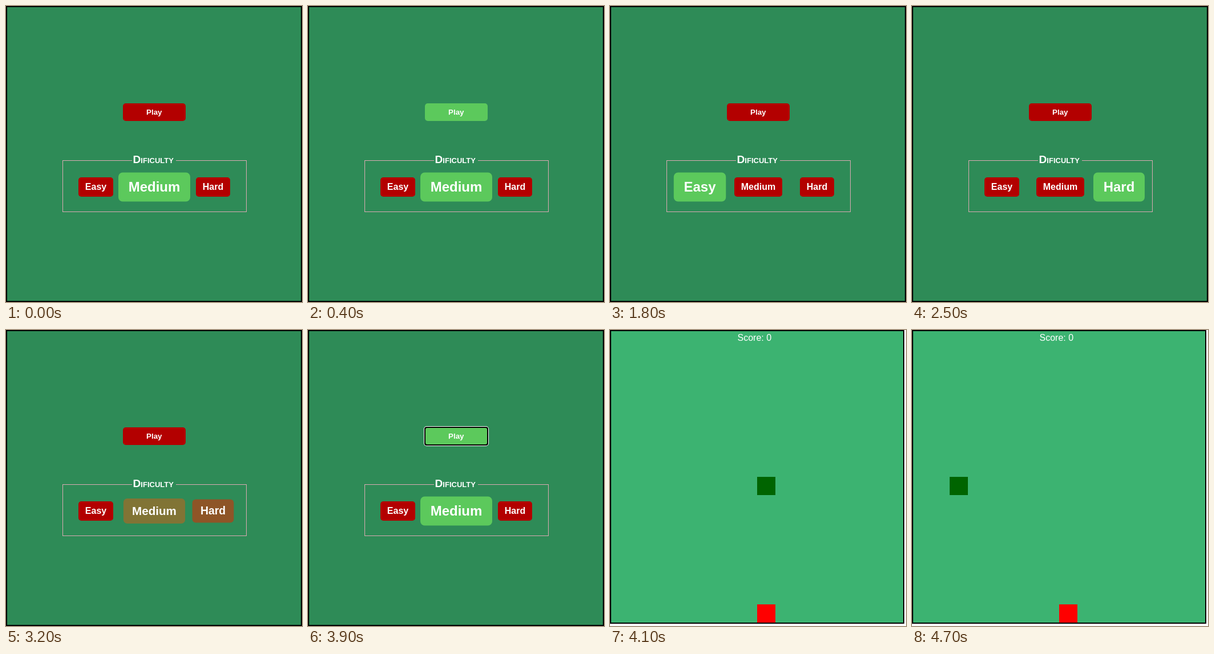
An HTML page with a canvas that plays this animation: 519x520 px, repeating every 4800 ms.

```html
<!DOCTYPE html>
<html lang="en">
<head>
<meta charset="utf-8">
<title>Snake menu</title>
<style>
  html, body { margin: 0; width: 100%; height: 100%; overflow: hidden; background: #fff; }
  canvas { display: block; }
</style>
</head>
<body>
<canvas id="stage" width="519" height="520"></canvas>
<script>
const ctx = document.getElementById('stage').getContext('2d');
const LOOP = 4800, STEP = 100;
const RED = [179, 0, 0], GREEN = [92, 201, 92];
const FONT = '"Liberation Sans", Arial, sans-serif';

const options = [
  { label: 'Easy', x: 157.5, width: 61 },
  { label: 'Medium', x: 260, width: 84 },
  { label: 'Hard', x: 363, width: 60 },
];
// Moments at which another difficulty is picked
const picks = [
  { at: -1000, label: 'Medium' },
  { at: 1470, label: 'Easy' },
  { at: 2200, label: 'Hard' },
  { at: 3100, label: 'Medium' },
];
const PICK_TIME = 300;

const rgb = c => `rgb(${c.join()})`;
const mix = (a, b, k) => a.map((v, i) => Math.round(v + (b[i] - v) * k));

// CSS "ease": cubic-bezier(.25, .1, .25, 1)
function ease(x) {
  if (x <= 0) return 0;
  if (x >= 1) return 1;
  const bezier = (p, q, s) => 3 * p * s * (1 - s) ** 2 + 3 * q * s * s * (1 - s) + s ** 3;
  let low = 0, high = 1;
  for (let i = 0; i < 20; i++) {
    const mid = (low + high) / 2;
    if (bezier(.25, .25, mid) < x) low = mid; else high = mid;
  }
  return bezier(.1, 1, low);
}

function box(x, y, w, h, color, radius = 0) {
  ctx.fillStyle = color;
  ctx.beginPath();
  ctx.roundRect(x, y, w, h, radius);
  ctx.fill();
}

function text(label, x, y, font, align = 'center') {
  ctx.font = `${font} ${FONT}`;
  ctx.textAlign = align;
  ctx.fillStyle = '#fff';
  ctx.fillText(label, x, y);
}

function panel(w, h, color) {
  box(0, 0, w, h, '#000');
  box(2, 2, w - 4, h - 4, color);
}

function playButton(t) {
  const hovered = (t >= 400 && t < 1100) || t >= 3700;
  const color = rgb(hovered ? GREEN : RED);
  if (t >= 3900) {
    box(203, 169, 114, 35, '#fff', 5);
    box(204, 170, 112, 33, '#000', 4);
    box(206, 172, 108, 29, color, 3);
  } else {
    box(205, 171, 110, 31, color, 5);
  }
  text('Play', 259.8, 191, 'bold 13.333px');
}

function difficulty(t) {
  ctx.strokeStyle = '#dcaab4';
  ctx.lineWidth = 1;
  ctx.strokeRect(99.5, 271.5, 322, 90);
  box(221, 270, 77, 3, '#2e8b57');
  text('Dificulty', 222.5, 276, 'small-caps bold 19.2px', 'left');

  const index = picks.findLastIndex(p => t >= p.at);
  const current = picks[index], previous = picks[index - 1];
  const k = ease((t - current.at) / PICK_TIME);
  for (const { label, x, width } of options) {
    const chosen = label === current.label ? k
      : previous && label === previous.label ? 1 - k : 0;
    ctx.save();
    ctx.translate(x, 318);
    ctx.scale(1 + chosen / 2, 1 + chosen / 2);
    box(-width / 2, -17, width, 34, rgb(mix(RED, GREEN, chosen)), 5);
    text(label, 0, 5.3, 'bold 16px');
    ctx.restore();
  }
}

function game(t) {
  const cell = 32, columns = 16;
  const cellBox = (col, row, color) => box(2 + col * cell, 2 + row * cell, cell, cell, color);
  panel(516, 516, '#3cb371');
  const column = (8 + Math.floor((t - 4070) / 60)) % columns;
  cellBox(8, 15, '#f00');
  cellBox(column, 8, '#006400');
  text('Score: 0', 223.5, 19, '16px', 'left');
}

function draw(t) {
  box(0, 0, 519, 520, '#fff');
  if (t < 4000) {
    panel(519, 520, '#2e8b57');
    playButton(t);
    difficulty(t);
  } else if (t < 4100) {
    panel(516, 516, '#fff');
  } else {
    game(t);
  }
}

const start = performance.now();
function tick() {
  const t = (performance.now() - start) % LOOP;
  draw(Math.floor(t / STEP) * STEP);
  requestAnimationFrame(tick);
}
tick();
</script>
</body>
</html>
```
